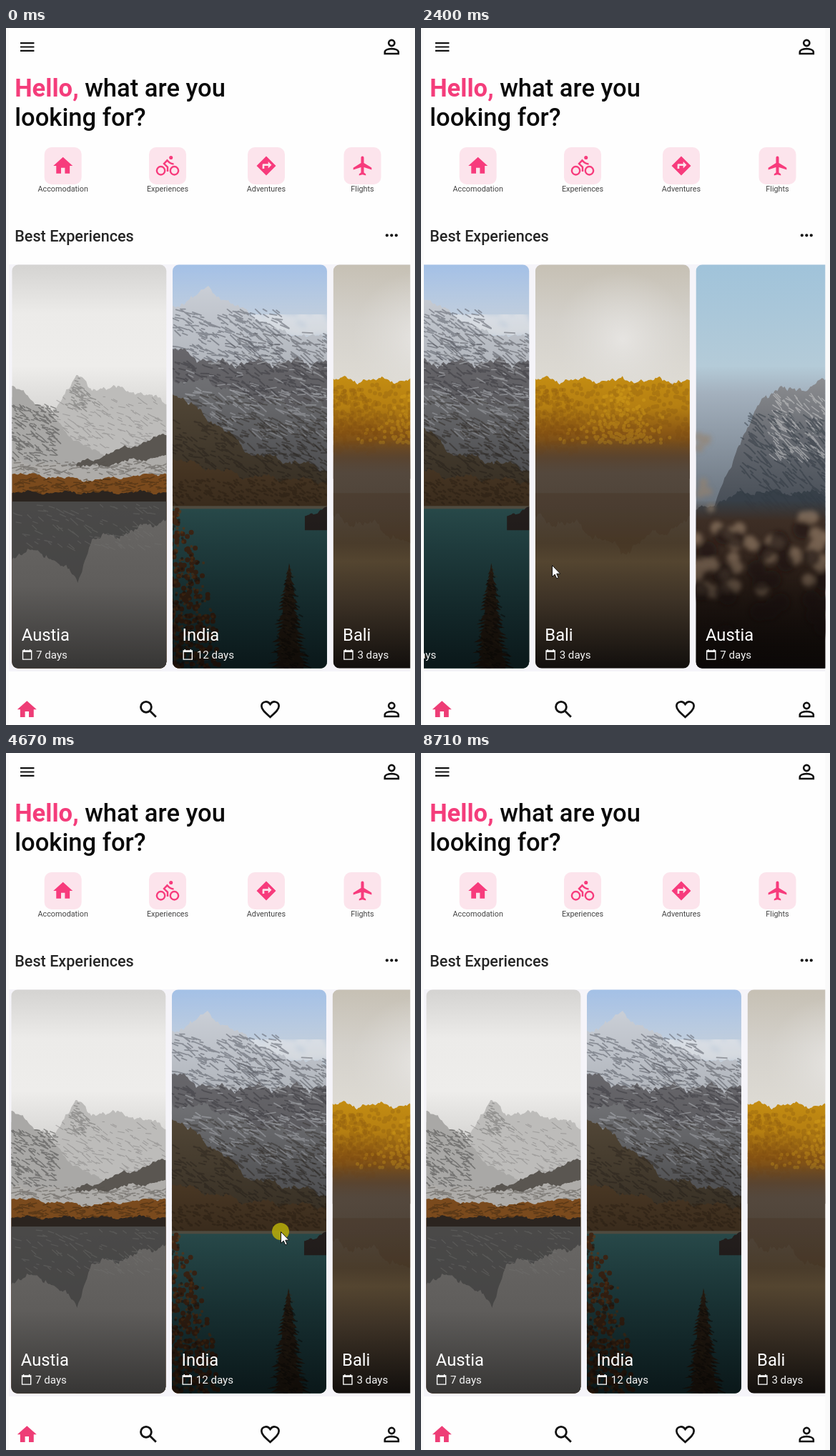
Write an HTML page that moves like this. It is 572 by 976 pixels and loops after 9190 ms.

```html
<!DOCTYPE html>
<html lang="en">
<head>
<meta charset="utf-8">
<title>Travel app</title>
<style>
  html, body { margin: 0; width: 100%; height: 100%; overflow: hidden; background: #fafafa; }
  svg { display: block; width: 100vw; height: 100vh; font-family: Roboto, sans-serif; }
</style>
</head>
<body>
<svg id="stage" viewBox="0 0 572 976"></svg>
<script>
const LOOP = 9190, DP = 1.08, CARD_W = 200 * DP, PITCH = 208 * DP, PINK = '#f43d7b';

let seed = 11;
const rnd = () => (seed = seed * 16807 % 2147483647) / 2147483647;
const fix = n => n.toFixed(1);

// Keys are [position, ...values]; linear in between
function lerp(keys, p) {
  const i = keys.findIndex(k => k[0] > p);
  if (i < 1) return (i ? keys[keys.length - 1] : keys[0])[1];
  const [a, b] = [keys[i - 1], keys[i]];
  return a[1] + (b[1] - a[1]) * (p - a[0]) / (b[0] - a[0]);
}

// Ridge line through a few points, roughened by octaves of sines
function hill(line, fill, rough = 5, base = 570, opacity = 1) {
  const keys = line.split(' ').map(p => p.split(',').map(Number));
  const x0 = keys[0][0], x1 = keys[keys.length - 1][0], phase = rnd() * 99;
  let d = `M${x0} ${base}`;
  for (let x = x0; x <= x1 + 2; x += 2) {
    let y = lerp(keys, x) + (rnd() - .5) * rough * .5;
    for (let k = 1; k < 5; k++) y += rough * .6 / k * Math.sin(x * .06 * 2 ** k + phase * k);
    d += `L${x} ${fix(y)}`;
  }
  return `<path d="${d}V${base}Z" fill="${fill}" opacity="${opacity}"/>`;
}

const box = (x, y, w, h) => () => [x + rnd() * w, y + rnd() * h];
const cone = (x, top, base, w) => () => {
  const p = Math.sqrt(rnd());
  return [x + w * p ** .7 * (rnd() + rnd() - 1) * 1.1, top + (base - top) * p];
};

// Short strokes, or dots when len is 0
function scatter(n, place, color, size, opacity, len = 0, slope = .5) {
  let d = '';
  while (n--) {
    const [x, y] = place(), l = len * (.3 + rnd());
    d += `M${fix(x)} ${fix(y)}l${fix(l)} ${fix(l * (slope + rnd() - .5))}`;
  }
  return `<path d="${d}" stroke="${color}" stroke-width="${size}" stroke-linecap="round" fill="none" opacity="${opacity}"/>`;
}

function spruce(x, top, base, w, fill) {
  let left = '', right = '';
  for (let y = top; y < base; y += 5) {
    const half = () => w * ((y - top + 3) / (base - top)) ** .8 * (.6 + .6 * rnd());
    right += `L${fix(x + half())} ${y + 6}L${fix(x + half() * .6)} ${y + 5}`;
    left = `L${fix(x - half() * .6)} ${y + 5}L${fix(x - half())} ${y + 6}` + left;
  }
  return `<path d="M${x} ${top}${right}${left}Z" fill="${fill}"/>`
    + scatter(w * 4, cone(x, top, base, w * .9), '#1f1b12', 2, .5, 5)
    + scatter(w * 2, cone(x, top, base, w * .9), '#8a6c3c', 1.5, .35, 4);
}

const leaves = place => scatter(260, place, '#8a4a22', 7, .9)
  + scatter(200, place, '#c4722f', 4, .7) + scatter(130, place, '#4d301c', 4, .6);

const grad = (id, stops) => `<linearGradient id="${id}" x2="0" y2="1">` + stops.split(' ').map(s => {
  const [at, color, alpha = 1] = s.split(':');
  return `<stop offset="${at}" stop-color="${color}" stop-opacity="${alpha}"/>`;
}).join('') + '</linearGradient>';

const rect = (x, y, w, h, fill, r = 0) =>
  `<rect x="${x}" y="${y}" width="${w}" height="${h}" rx="${r}" fill="${fill}"/>`;
const text = (x, y, dp, str, fill = '#fff', weight = 400, anchor = 'start') =>
  `<text x="${x}" y="${y}" font-size="${dp * DP}" font-weight="${weight}" fill="${fill}" text-anchor="${anchor}">${str}</text>`;

// Icons on a 24 grid: [path, stroke width], no width means filled
const ring = (x, y, r) => `M${x - r} ${y}a${r} ${r} 0 1 0 ${2 * r} 0a${r} ${r} 0 1 0 ${-2 * r} 0`;
const ICONS = {
  home: ['M10 20v-6h4v6h5v-8h3L12 3 2 12h3v8z'],
  bike: [ring(5, 17, 4.2) + ring(19, 17, 4.2) + ring(15.5, 3.5, 1) + 'M12 18v-4.7L8.3 9.8 11.6 6.3 14 8.7q2 1.4 4.3 1.4', 1.8],
  turn: ['M12 2l10 10-10 10L2 12zM8 15v-4q0-1 1-1h5V7.5l3.5 3.5-3.5 3.5V12h-4v3z'],
  flight: ['M21.5 16v-2l-8-5V3.5a1.5 1.5 0 00-3 0V9l-8 5v2l8-2.5V19l-2 1.5V22l3.5-1 3.5 1v-1.5l-2-1.5v-5.5z'],
  menu: ['M3 7h18M3 12h18M3 17h18', 2],
  person: [ring(12, 8, 3.05) + 'M4.95 19.05V17q.5-2.6 7.05-3.05 6.55.45 7.05 3.05v2.05z', 1.9],
  search: [ring(9.5, 9.5, 5.5) + 'M14 14l5.8 5.8', 2.1],
  heart: ['M12 20C6.5 15 3 12 3 8.5 3 4 9 2.2 12 6.6 15 2.2 21 4 21 8.5 21 12 17.5 15 12 20z', 2],
  dots: [ring(6, 12, 2) + ring(12, 12, 2) + ring(18, 12, 2)],
  date: ['M3 4h18v18H3zV6h18M6 1v3M18 1v3', 2],
  back: ['M16.8 3l-9 9 9 9', 2.5]
};
function icon(name, x, y, dp, fill = '#111') {
  const [d, w] = ICONS[name];
  const paint = w ? `fill="none" stroke="${fill}" stroke-width="${w}"` : `fill="${fill}" fill-rule="evenodd"`;
  return `<path d="${d}" ${paint} transform="translate(${x} ${y}) scale(${dp * DP / 24}) translate(-12 -12)"/>`;
}

const peaks = () => rect(0, 0, 217, 567, 'url(#mist)')
  + hill('0,185 56,206 91,156 112,172 165,175 216,192', '#bdbcba', 5)
  + scatter(170, box(60, 185, 156, 75), '#7c7b7a', 1.2, .45, 8)
  + scatter(60, cone(92, 158, 200, 26), '#6f6e6d', 1.5, .5, 7)
  + hill('0,170 40,196 75,235 120,265 216,275', '#a9a8a6', 4)
  + scatter(190, box(-5, 195, 65, 80), '#4c4b4a', 1.5, .55, 7)
  + hill('90,280 150,260 216,238', '#5a5651', 4)
  + hill('0,276 110,283 216,268', '#aeaca9', 4)
  + scatter(120, box(0, 276, 216, 18), '#56524d', 1.5, .5, 8, 0)
  + hill('0,292 110,302 216,292', '#7a4a1d', 3) + scatter(140, box(0, 300, 216, 20), '#3d2813', 1.5, .5, 8, 0)
  + hill('0,319 216,319', '#2b241f', 3) + rect(0, 332, 217, 235, 'url(#still)')
  + hill('0,410 40,400 92,440 112,385 160,376 216,356', '#3a3a3a', 6, 332, .65)
  + scatter(100, box(0, 335, 200, 60), '#777573', 1.3, .35, 8);

const lake = () => rect(0, 0, 217, 567, 'url(#blue)')
  + `<g filter="url(#soft)">${scatter(26, box(110, 72, 110, 25), '#f0f4f9', 18, .8)}</g>`
  + hill('0,60 50,34 95,62 150,94 216,104', '#d0d5dd', 5)
  + scatter(210, box(-5, 62, 160, 75), '#666b75', 1.8, .55, 11)
  + scatter(110, box(80, 95, 140, 40), '#5c5f66', 1.8, .5, 12)
  + hill('0,118 60,138 216,136', '#76757a', 7)
  + scatter(170, box(-5, 135, 225, 50), '#45454a', 2, .5, 9)
  + scatter(80, box(-5, 125, 225, 65), '#d3d7dd', 1.6, .55, 12, .2)
  + hill('0,160 60,166 120,194 216,196', '#85868a', 7)
  + scatter(130, box(10, 172, 206, 65), '#d4d8de', 1.8, .55, 13)
  + scatter(150, box(10, 180, 206, 90), '#47433f', 2, .5, 11)
  + hill('0,178 60,222 110,264 216,286', '#665844', 6)
  + scatter(380, box(-5, 215, 225, 110), '#3a3228', 2, .45, 8)
  + hill('0,272 100,296 216,304', '#76593a', 5) + scatter(220, box(-5, 300, 225, 34), '#4c3823', 2.5, .5, 4)
  + rect(0, 338, 217, 5, '#a39a82') + rect(0, 342, 217, 225, 'url(#teal)')
  + hill('185,354 216,338', '#4a3f3c', 3, 372)
  + leaves(cone(8, 335, 570, 70)) + spruce(163, 418, 570, 29, '#58402a');

const forest = () => rect(0, 0, 217, 567, 'url(#dusk)') + '<circle cx="122" cy="105" r="95" fill="url(#sun)"/>'
  + hill('0,161 216,163', 'url(#gold)', 5, 300)
  + scatter(320, box(0, 168, 216, 85), '#74450f', 6, .22)
  + scatter(200, cone(120, 165, 250, 90), '#e8b41c', 5, .25)
  + scatter(160, box(0, 175, 60, 90), '#6e3c0c', 6, .2)
  + rect(0, 245, 217, 322, 'url(#pond)')
  + hill('0,355 60,366 122,402 170,376 216,360', '#3b2614', 8, 320, .22);

const meadow = () => rect(0, 0, 217, 567, 'url(#day)')
  + hill('22,350 58,256 96,184 119,170 140,180 176,160 216,158', 'url(#rock)', 6, 400)
  + scatter(190, box(100, 180, 116, 90), '#d0d0d0', 1.5, .5, 9, .9)
  + scatter(330, box(60, 205, 156, 150), '#2c333c', 2, .45, 11, .9)
  + hill('0,345 70,318 216,320', '#333b44', 5, 420, .8) + rect(0, 330, 217, 237, 'url(#soil)')
  + '<g filter="url(#soft)">' + scatter(45, box(0, 350, 216, 110), '#b39a80', 18, .5)
  + scatter(30, box(0, 370, 216, 150), '#1c120d', 26, .6) + scatter(10, box(2, 240, 20, 110), '#96836d', 12, .6) + '</g>'
  + rect(0, 400, 217, 167, 'url(#fade)');

const valley = () => rect(0, 0, 572, 292, '#dfe9f4')
  + hill('0,-20 240,-10 330,27 390,4 500,10 530,36 572,20', '#c3c8d1', 4)
  + scatter(330, box(-10, 0, 310, 75), '#5f646e', 2, .5, 15, .3)
  + scatter(160, box(320, 18, 210, 45), '#777c86', 1.8, .5, 14, .2)
  + hill('0,60 120,62 200,72 320,72 400,58 572,62', '#858180', 6)
  + scatter(280, box(-10, 62, 540, 60), '#4a4744', 2, .5, 12, .2)
  + scatter(110, box(150, 50, 360, 50), '#d9dde3', 1.8, .5, 14, .2)
  + hill('0,95 90,76 190,74 250,112 330,124 572,124', '#4c4330', 6)
  + scatter(300, box(-10, 85, 260, 76), '#28241b', 2.5, .5, 7)
  + scatter(200, box(220, 126, 200, 32), '#77623a', 3, .5, 6, 0)
  + rect(0, 163, 572, 130, 'url(#teal2)') + rect(215, 161, 145, 3, '#a89c78')
  + hill('350,178 410,146 572,118', '#36321f', 5, 184) + scatter(160, box(385, 145, 130, 35), '#1f1d13', 3, .6, 5)
  + [[10, 125, 40], [48, 212, 24], [150, 150, 30], [182, 84, 36], [116, 105, 40], [323, 206, 20],
    [361, 250, 11], [382, 242, 22], [468, 196, 16], [484, 186, 16]]
    .map(([x, top, w]) => spruce(x, top, 296, w, '#4a3b20')).join('')
  + leaves(cone(228, 175, 296, 32)) + spruce(556, -60, 300, 62, '#211d14');

const CARDS = [['Austia', 7, peaks()], ['India', 12, '<use href="#lake"/>' + rect(0, 0, 217, 567, 'url(#shade)')],
  ['Bali', 3, forest()], ['Austia', 7, meadow()]];

const card = ([name, days, art], i) =>
  `<g transform="translate(${8.3 + i * PITCH} 331.3)"><g clip-path="url(#card)">${art}</g>`
  + text(13.5, 526.5, 22, name) + icon('date', 21.3, 546, 15, '#fff') + text(33.8, 551.3, 14, days + ' days', '#f4f4f4') + '</g>';

const category = (x, name, label) => rect(x - 26, 167, 52, 52, '#fce4ec', 10)
  + icon(name, x, 193, 30, '#f73b7c') + text(x, 228.5, 10, label, '#444', 400, 'middle');

const lorem = ['Ipsum is simply dummy text of the printing and typesetting',
  'industry. Lorem Ipsum has been the industrys standard dummy',
  'text ever since the 1500s, when an unknown printer took a galley',
  'of type and scrambled it to make a type'];

stage.innerHTML = '<defs>'
  + grad('mist', '0:#d4d3d1 .12:#ecebe9 .25:#eeedeb .36:#d8d7d5 1:#c4c3c1') + grad('still', '0:#6a6866 .5:#5f5d5b 1:#363534')
  + grad('blue', '0:#a3c0e6 .16:#dbe6f2 1:#dbe6f2') + grad('teal', '0:#529798 1:#38808a')
  + grad('shade', '0:#000:0 .3:#000:.18 .6:#000:.52 1:#000:.82')
  + grad('dusk', '0:#c6c0b4 .14:#d4d1cb .28:#dddad3 1:#dddad3')
  + grad('gold', '0:#c48d12 .3:#b57f12 .55:#8a5714 .8:#5f4022 1:#55463a')
  + grad('pond', '0:#564739:0 .15:#54483d .3:#4e4338 .45:#4a3c2b .53:#544530 .7:#3d3226 1:#110e0c')
  + grad('day', '0:#a0c3da .25:#b4cbd8 .32:#a3b0bd .55:#737d88 1:#333')
  + grad('rock', '0:#8f9093 .4:#62666d 1:#333c46')
  + grad('soil', '0:#3d3129:0 .12:#3d2e25 .5:#2c1f18 1:#120c09') + grad('fade', '0:#0b0807:0 1:#0b0807:.9')
  + grad('teal2', '0:#4a9698 .4:#2f878d 1:#24747c')
  + '<radialGradient id="sun"><stop stop-color="#e6e4e1"/><stop offset="1" stop-color="#dedcd8" stop-opacity="0"/></radialGradient>'
  + '<filter id="soft"><feGaussianBlur stdDeviation="3"/></filter>'
  + `<clipPath id="card"><rect width="${CARD_W}" height="565.3" rx="9"/></clipPath>`
  + `<clipPath id="flat"><rect width="${CARD_W}" height="563"/></clipPath>`
  + '<clipPath id="view"><rect x="4" y="320" width="561.3" height="590"/></clipPath>'
  + '<clipPath id="photo"><rect x="-8" y="-60" width="588" height="352" rx="43"/></clipPath>'
  + `<g id="lake">${lake()}</g></defs>`
  + '<g id="home">' + rect(0, 0, 572, 976, '#fafafa') + rect(4, 0, 561.3, 976, '#fefefe')
  + icon('menu', 29.7, 26.5, 24) + icon('person', 539.3, 26.4, 30)
  + text(12.2, 96, 32, `<tspan fill="${PINK}" font-weight="700">Hello,</tspan> what are you`, '#0a0a0a', 500)
  + text(12.2, 136.5, 32, 'looking for?', '#0a0a0a', 500)
  + category(79.7, 'home', 'Accomodation') + category(226, 'bike', 'Experiences')
  + category(364, 'turn', 'Adventures') + category(498.5, 'flight', 'Flights')
  + text(12.2, 299, 20, 'Best Experiences', '#262626', 500) + icon('dots', 539.3, 290.3, 24)
  + rect(4, 331, 561.3, 570, '#f5f4f9')
  + `<g clip-path="url(#view)"><g id="list">${CARDS.map(card).join('')}</g></g>`
  + icon('home', 29.3, 954.3, 30, '#ee3d76') + icon('search', 199.3, 954.2, 30)
  + icon('heart', 369.5, 954.2, 30) + icon('person', 539.3, 954.4, 30)
  + '<g id="hero">' + rect(231.8, 860, CARD_W, 36.6, '#3b3b3d', 9)
  + '<g transform="translate(231.8 324)" clip-path="url(#flat)"><use href="#lake"/></g>'
  + icon('back', 17, 256, 22, '#f1f1f1') + '</g></g>'
  + '<g id="detail">' + rect(0, 0, 572, 976, '#fafafa') + `<g clip-path="url(#photo)">${valley()}</g>`
  + icon('back', 16.8, 24.3, 24) + icon('date', 19, 318.5, 21, '#9e9e9e') + text(35, 324, 14, '12 days', '#9e9e9e')
  + text(.8, 374.5, 22, 'India', '#0a0a0a', 700)
  + lorem.map((s, i) => text(.8, 398 + i * 22.75, 18, s, '#a2a2a2', 500)).join('')
  + rect(-8, 893.5, 588, 150, '#ec407a', 43)
  + text(3, 928, 18, 'Price') + text(3.5, 959.5, 26, '$300', '#fff', 700)
  + rect(437.5, 916, 127.5, 42, '#fff', 10) + text(501.3, 945, 20, 'Book a tour', '#ec407a', 400, 'middle') + '</g>'
  + '<g id="cursor"><circle id="press" r="12" fill="#b5ab0a" opacity=".88"/>'
  + '<path d="M.5.5V16.5L4.2 13.1 6.7 18.8 9.2 17.7 6.7 12.2H11.8Z" fill="#fff" stroke="#111"/></g>';

const clamp = p => Math.max(0, Math.min(1, p));
const progress = (t, a, b) => clamp((t - a) / (b - a));
const smooth = p => p * p * (3 - 2 * p);

// [from, to, x, y]
const MOVES = [[290, 360, 422, 910], [600, 690, 424, 766], [830, 1000, 480, 752], [1150, 2020, 183, 752],
  [2800, 3430, 457, 752], [3760, 4290, 384, 670], [5220, 5290, 375, 664], [5860, 5920, 362, 657],
  [5920, 7080, 20, 19], [7780, 8650, 549, 960]];
const PRESSES = [[1150, 2300], [2800, 3700], [4440, 5050], [7240, 7630]];

const pointer = t => MOVES.reduce(([x, y], [a, b, u, v]) => {
  const p = progress(t, a, b);
  return [x + (u - x) * p, y + (v - y) * p];
}, [449, 944]);
const scroll = t => 338 * smooth(progress(t, 1785, 2570)) - 337 * smooth(progress(t, 2800, 4290));

const el = id => document.getElementById(id);
const show = (id, on) => el(id).setAttribute('display', on ? 'inline' : 'none');
const move = (id, x, y) => el(id).setAttribute('transform', `translate(${x} ${y})`);
const within = (t, a, b) => t >= a && t < b;

function draw(t) {
  const inDetail = within(t, 5050, 7630);
  show('home', !inDetail);
  show('detail', inDetail);
  show('hero', within(t, 7630, 7780));
  show('cursor', within(t, 290, 8710));
  show('press', PRESSES.some(p => within(t, ...p)));
  move('list', -scroll(t), 0);
  move('cursor', ...pointer(t));
}

const start = performance.now();
function tick() {
  draw((performance.now() - start) % LOOP);
  requestAnimationFrame(tick);
}
tick();
</script>
</body>
</html>
```
